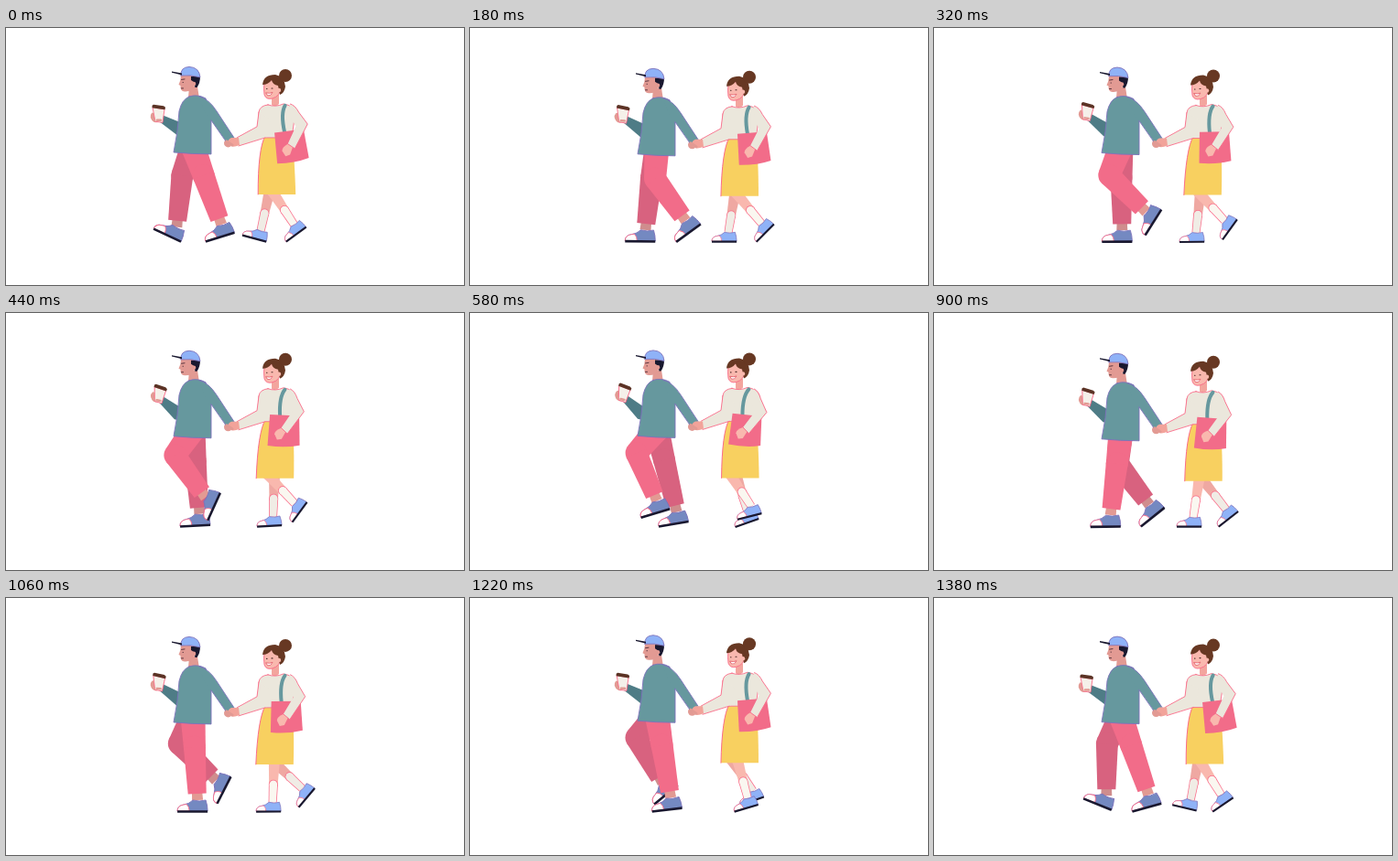
An HTML page with a canvas for the animation above (1400 ms loop, 500 by 281 pixels).

```html
<!DOCTYPE html>
<html>
<head>
<meta charset="utf-8">
<title>Walking couple</title>
<style>
html, body { margin: 0; width: 100%; height: 100%; overflow: hidden; background: #fff; }
canvas { display: block; }
</style>
</head>
<body>
<canvas id="stage" width="500" height="281"></canvas>
<script>
const ctx = document.getElementById('stage').getContext('2d');
const PERIOD = 1400, TAU = Math.PI * 2;
const PINK = '#f26c89', ROSE = '#d8627f', TEAL = '#66989e', DEEP_TEAL = '#4e7c86';
const CREAM = '#ebe7dc', YELLOW = '#f8d060', BLUE = '#8fb2f7', SHOE = '#7489c1';
const NAVY = '#19182f', TAN = '#e29a93', BLUSH = '#f9b8ae', BROWN = '#673823';
const EDGE = '#fa6c8a', VIOLET = '#7d72bb';

// Foot keys: phase, toe x, toe y, sole angle in degrees
const manStep = [
  [0, 161, 220, 25], [.136, 170, 234, 0], [.257, 187, 234, 0], [.314, 190, 234, -3],
  [.49, 217, 234, -16], [.64, 226, 234, -38], [.757, 231, 225, -63],
  [.814, 221, 227, -66], [.9, 192, 225, -25]
];
const womanFarStep = [
  [0, 258, 227, 15], [.129, 264, 234, 0], [.314, 274, 234, -3], [.5, 303, 234.5, -33],
  [.643, 311, 234, -38], [.757, 320, 229, -50], [.87, 296, 227, -20]
];
const womanNearStep = [
  [0, 270, 226, 17], [.06, 260, 229, 12], [.143, 265, 234, 0], [.257, 273, 234, 0],
  [.5, 306, 234, -36], [.629, 313, 234, -45], [.814, 313, 229, -54], [.92, 291, 226, -12]
];

// Periodic cubic spline through the keys
function sample(keys, phase) {
  const n = keys.length;
  const key = i => {
    const k = keys[(i + n) % n];
    return [k[0] + Math.floor(i / n), k[1], k[2], k[3]];
  };
  let i = n - 1;
  while (keys[i][0] > phase) i--;
  const [a, b, c, d] = [key(i - 1), key(i), key(i + 1), key(i + 2)];
  const h = c[0] - b[0], u = (phase - b[0]) / h;
  return [1, 2, 3].map(j => {
    const m0 = (c[j] - a[j]) / (c[0] - a[0]) * h;
    const m1 = (d[j] - b[j]) / (d[0] - b[0]) * h;
    return b[j] + u * (m0 + u * (3 * (c[j] - b[j]) - 2 * m0 - m1
      + u * (2 * (b[j] - c[j]) + m0 + m1)));
  });
}

function shape(d, fill, edge) {
  const path = new Path2D(d);
  ctx.fillStyle = fill;
  ctx.fill(path);
  if (edge) {
    ctx.strokeStyle = edge;
    ctx.lineWidth = .9;
    ctx.stroke(path);
  }
}

function line(d, color, width) {
  ctx.strokeStyle = color;
  ctx.lineWidth = width;
  ctx.lineCap = 'round';
  ctx.stroke(new Path2D(d));
}

function dot(x, y, r, color) {
  ctx.fillStyle = color;
  ctx.beginPath();
  ctx.arc(x, y, r, 0, TAU);
  ctx.fill();
}

function placed(x, y, angle, draw) {
  ctx.save();
  ctx.translate(x, y);
  ctx.rotate(angle);
  draw();
  ctx.restore();
}

const mix = (a, b, k) => [a[0] + (b[0] - a[0]) * k, a[1] + (b[1] - a[1]) * k];

// Tapered limb segment with a rounded start
function limb(a, b, wa, wb, color) {
  const len = Math.hypot(b[0] - a[0], b[1] - a[1]);
  const nx = (a[1] - b[1]) / len / 2, ny = (b[0] - a[0]) / len / 2;
  dot(a[0], a[1], wa / 2, color);
  ctx.beginPath();
  ctx.moveTo(a[0] + nx * wa, a[1] + ny * wa);
  ctx.lineTo(b[0] + nx * wb, b[1] + ny * wb);
  ctx.lineTo(b[0] - nx * wb, b[1] - ny * wb);
  ctx.lineTo(a[0] - nx * wa, a[1] - ny * wa);
  ctx.fill();
}

// Knee of a two-bone leg, bending toward the left
function kneeOf(hip, ankle, thigh, shin) {
  const dx = ankle[0] - hip[0], dy = ankle[1] - hip[1];
  const dist = Math.hypot(dx, dy), d = Math.min(dist, thigh + shin);
  const along = (thigh * thigh - shin * shin + d * d) / (2 * d);
  const out = Math.sqrt(Math.max(0, thigh * thigh - along * along));
  return [hip[0] + (dx * along - dy * out) / dist, hip[1] + (dy * along + dx * out) / dist];
}

function foot(keys, phase, size) {
  const [x, y, deg] = sample(keys, phase % 1);
  const angle = deg * Math.PI / 180, c = Math.cos(angle), s = Math.sin(angle);
  const ax = 22 * size, ay = -13 * size;
  return { x, y, angle, size, ankle: [x + ax * c - ay * s, y + ax * s + ay * c] };
}

function shoe(f, color) {
  placed(f.x, f.y, f.angle, () => {
    ctx.scale(f.size, f.size);
    shape('M0-1Q0-7 7-8Q13-9 17-13Q24-11 31-13Q33-7 33-1Z', color, VIOLET);
    shape('M0-1Q0-7 7-8L10-8.500Q13-6 13-1Z', '#fff', EDGE);
    shape('M0-1.800H33V.8H0Z', NAVY);
  });
}

function manLeg(phase, bob, color, skin) {
  const f = foot(manStep, phase, 1), hip = [204, 129 + bob];
  const knee = kneeOf(hip, f.ankle, 34, 57), hem = mix(knee, f.ankle, .88);
  limb(mix(knee, f.ankle, .8), f.ankle, 11, 12, skin);
  shoe(f, SHOE);
  limb(hip, knee, 27, 24, color);
  limb(knee, hem, 24, 20, color);
}

function womanLeg(keys, phase, bob, skin, sock) {
  const f = foot(keys, phase, .82), hip = [294, 150 + bob];
  const knee = kneeOf(hip, f.ankle, 29, 43), cuff = mix(knee, f.ankle, .56);
  limb(hip, knee, 13, 12, skin);
  limb(knee, cuff, 12, 9.5, skin);
  limb(cuff, f.ankle, 10, 9, EDGE);
  limb(cuff, f.ankle, 8.5, 7.5, sock);
  shoe(f, BLUE);
}

function cupArm(lift) {
  placed(190 - 16 * lift, 112, lift, () => {
    shape('M5-7L-18-16L-22-9L-2 6L8 6Z', DEEP_TEAL);
    dot(-26, -14, 5.5, TAN);
    shape('M-30-25L-17-23L-19-8.500L-27-9.500Z', '#f5f0e9', EDGE);
    shape('M-29-28L-18-26.500L-16-25L-16.500-22.500L-30.500-24.500V-27Z', '#5b3325');
    line('M-30-18Q-33-14-28-11M-21-11L-25-11', TAN, 2.5);
  });
}

function man() {
  // neck, face, hair and cap
  shape('M200 64L209 64L211 77Q204 80 199 76Z', TAN);
  shape('M191 52Q191 57 188.500 62L190.500 63Q190 69 195 69.500Q203 70 206 63L208 52Z', TAN);
  shape('M202 53H212Q212 60 208.500 65L206.500 65L205 59L202 57Z', NAVY);
  dot(205, 61, 2.3, TAN);
  line('M191.500 56.500L195 56M193 59.500H193.500M191.500 66H193.500', '#4c2b36', .9);
  shape('M191 52Q190 43 200 42.500Q211 43 212 54Q202 51 191 52Z', BLUE, VIOLET);
  shape('M181 47.500L192 49.500V51.500Q186 50 181 48.800Z', NAVY);
  // torso and near arm
  shape('M200 75Q192 78 189 91Q188 112 183 136Q203 138 224 138V100L218 77Q209 72 200 75Z', TEAL, VIOLET);
  dot(242.500, 126, 4.5, TAN);
  shape('M210 75Q221 77 230 91L249 120L241 125L224 101Q216 93 214 84Z', TEAL);
  line('M211 75Q221 77 230 91L249 120M224 101L240 124', VIOLET, .9);
}

function skirt(sway) {
  shape(`M283 118Q275 132 ${274 + sway} 182H${315 + sway}Q315 140 312 117Z`, YELLOW);
  line(`M283 118Q275 132 ${274 + sway} 182`, EDGE, 1);
}

function womanTop() {
  shape('M290 73H298V83Q294 87 290 84Z', '#f3a59e');
  shape('M282 59Q281 67 282 73Q284 79 291 77Q299 75 301 64L299 56Z', BLUSH, EDGE);
  shape('M280 62Q281 51 294 51Q304 53 305 64Q304 71 299 73L297 63Q291 62 290 57Q286 62 280 62Z', BROWN);
  dot(305, 52, 7, BROWN);
  dot(298, 68, 2.2, BLUSH);
  line('M284.500 66.500H285M290 66H291', '#4b2a28', 1.1);
  shape('M284 71Q288 72 291 70.500Q289 75 286 74Z', '#fff', '#e5626f');
  // sweater and leading arm
  shape('M286 84Q277 85 276 92L275 107L283 120H312L316 92Q314 85 303 83Q294 87 286 84Z', CREAM, EDGE);
  shape('M276 92L274 108L252 120L254 129L285 119L289 100Z', CREAM);
  line('M276 92L274 108L252 120M254 129L283 120', EDGE, .9);
  shape('M254 120L246 120Q241 122 243 127Q246 132 255 128Z', '#f2a39a');
  line('M241 124L247 128', TAN, 3);
}

function bagArm(swing) {
  placed(303.5, 84, swing, () => {
    line('M-3 30Q-5 9 1 1', TEAL, 4);
    shape('M-14 29L18 29L20 61Q4 65-15 63Z', PINK);
    shape('M-8 50Q-8 46-1 43L4 47L0 55L-5 56Z', BLUSH);
    shape('M6 0Q12 2 15 10L23 24L6 49L-1 43L10 25L6 16Z', CREAM);
    line('M7 0Q12 2 15 10L23 24L6 49L-1 43', EDGE, .9);
  });
}

function frame(now) {
  const t = now % PERIOD, phase = t / PERIOD;
  const bob = 1.8 * Math.cos(TAU * (t - 180) / 700);
  const lift = .115 * (1 - Math.cos(TAU * (t + 60) / PERIOD));
  ctx.fillStyle = '#fff';
  ctx.fillRect(0, 0, 500, 281);

  placed(0, bob, 0, () => cupArm(lift));
  manLeg(phase, bob, ROSE, '#cf8d8d');
  manLeg(phase + .5, bob, PINK, TAN);

  womanLeg(womanFarStep, phase, bob, '#efa8a2', '#f0ece5');
  womanLeg(womanNearStep, phase + .5, bob, BLUSH, '#faf7f0');
  placed(0, bob, 0, () => {
    man();
    skirt(1.2 * Math.cos(TAU * t / 700));
    womanTop();
    bagArm(-.12 * Math.cos(TAU * phase));
  });
  requestAnimationFrame(frame);
}
requestAnimationFrame(frame);
</script>
</body>
</html>
```
